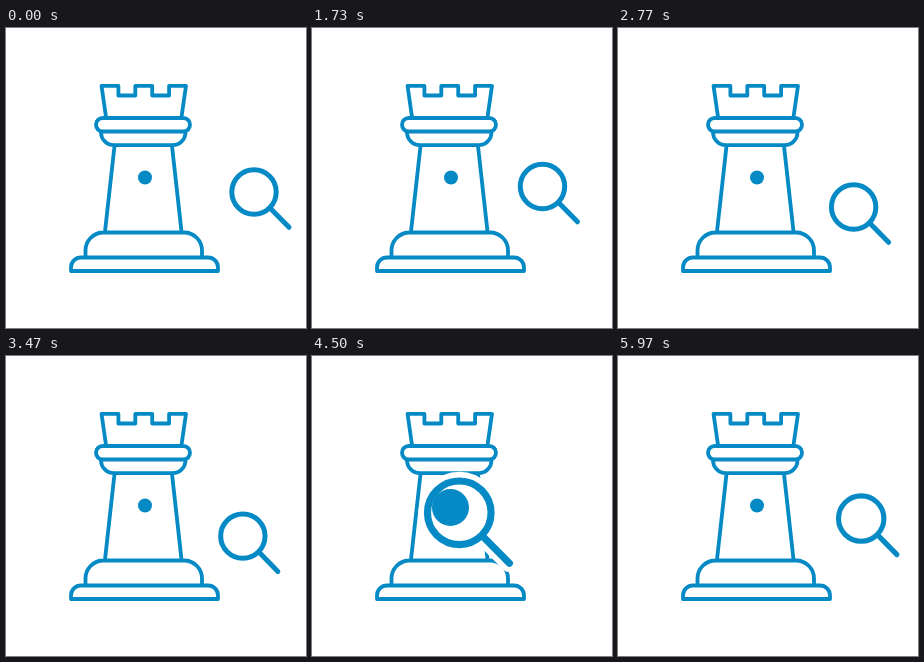
An HTML page with a canvas for the animation above (6010 ms loop, 300 by 300 pixels).

```html
<!DOCTYPE html>
<html lang="en">
<head>
<meta charset="utf-8">
<title>Rook and magnifier</title>
<style>
html, body { margin: 0; width: 100%; height: 100%; overflow: hidden; background: #fff; }
canvas { display: block; width: 300px; height: 300px; }
</style>
</head>
<body>
<canvas id="stage" width="300" height="300"></canvas>
<script>
const ctx = document.getElementById('stage').getContext('2d');
const BLUE = '#058ac6';
const LOOP = 6010;
const TICKS = 180;
const ZOOM = 1.48;
const STEP = 13.5; // ticks between wander points
const HOME = [248, 164];
const FOCUS = [138.5, 153.8];

// Lens centres of the idle wandering, evenly spaced in time
const WANDER = [
  HOME, [241, 148], [229.5, 149.5], [222.5, 163.5], [232, 158],
  [238, 163], [235, 178.5], [242, 176], [234, 181], [226.5, 174.5]
];
const REST = WANDER[WANDER.length - 1];
const REST_AT = STEP * (WANDER.length - 1);

const mix = (a, b, p) => a + (b - a) * p;

function ease(a, b, t) {
  const u = Math.min(1, Math.max(0, (t - a) / (b - a)));
  return u * u * (3 - 2 * u);
}

function makeRook() {
  const rook = new Path2D();
  rook.moveTo(100, 89);
  for (let i = 0; i < 5; i++) {
    const y = i % 2 ? 67.5 : 57.8;
    rook.lineTo(95.5 + i * 16.9, y);
    rook.lineTo(95.5 + (i + 1) * 16.9, y);
  }
  rook.lineTo(175.5, 89);
  rook.roundRect(90, 90, 94, 13.5, 6.7);
  rook.roundRect(95, 103.5, 84.5, 13.7, [0, 0, 13, 13]);
  rook.moveTo(108.5, 118);
  rook.lineTo(99, 203.5);
  rook.moveTo(166, 118);
  rook.lineTo(175.5, 203.5);
  rook.roundRect(79.5, 204.5, 116.5, 25, [18, 18, 0, 0]);
  rook.roundRect(65, 229.5, 147, 13.5, [10, 10, 0, 0]);
  return rook;
}
const ROOK = makeRook();

// Smooth curve through the wander points
function wander(t, axis) {
  const i = Math.min(WANDER.length - 2, Math.floor(t / STEP));
  const u = t / STEP - i;
  const at = n => WANDER[Math.min(WANDER.length - 1, Math.max(0, n))][axis];
  const [a, b, c, d] = [at(i - 1), at(i), at(i + 1), at(i + 2)];
  return b + u / 2 * (c - a + u * (2 * a - 5 * b + 4 * c - d + u * (3 * (b - c) + d - a)));
}

function glide(from, to, p, bend) {
  return {
    x: mix(from[0], to[0], p),
    y: mix(from[1], to[1], p) + bend * p * (1 - p)
  };
}

function lensAt(t) {
  if (t < REST_AT) return { x: wander(t, 0), y: wander(t, 1), s: 1 };
  if (t < 160) {
    const p = ease(REST_AT, 138, t);
    return { ...glide(REST, FOCUS, p, 10), s: mix(1, ZOOM, p) };
  }
  const p = ease(165, 180.8, t);
  return { ...glide(FOCUS, HOME, p, -24), s: mix(ZOOM, 1, p) };
}

function disc(x, y, r, color) {
  ctx.fillStyle = color;
  ctx.beginPath();
  ctx.arc(x, y, r, 0, Math.PI * 2);
  ctx.fill();
}

function handle(width, color) {
  ctx.strokeStyle = color;
  ctx.lineWidth = width;
  ctx.beginPath();
  ctx.moveTo(16.5, 16.5);
  ctx.lineTo(35, 35.3);
  ctx.stroke();
}

function drawLens({ x, y, s }) {
  ctx.save();
  ctx.translate(x, y);
  ctx.scale(s, s);
  disc(0, 0, 28.6, '#fff');
  handle(12.5, '#fff');
  ctx.restore();

  // Enlarged emblem, visible only through the glass
  ctx.save();
  ctx.beginPath();
  ctx.arc(x, y, 22 * s, 0, Math.PI * 2);
  ctx.clip();
  disc(138.5, 151.5, 18.5, BLUE);
  ctx.restore();

  ctx.save();
  ctx.translate(x, y);
  ctx.scale(s, s);
  handle(5, BLUE);
  ctx.beginPath();
  ctx.arc(0, 0, 22.2, 0, Math.PI * 2);
  ctx.stroke();
  ctx.restore();
}

function draw(now) {
  const t = (now % LOOP) / LOOP * TICKS;
  ctx.fillStyle = '#fff';
  ctx.fillRect(0, 0, 300, 300);
  ctx.lineCap = ctx.lineJoin = 'round';
  ctx.strokeStyle = BLUE;
  ctx.lineWidth = 3.8;
  ctx.stroke(ROOK);
  disc(139, 149.5, 7, BLUE);
  drawLens(lensAt(t));
}

let start;
function tick(now) {
  if (start === undefined) start = now;
  draw(Math.max(0, now - start));
  requestAnimationFrame(tick);
}
draw(0);
requestAnimationFrame(tick);
</script>
</body>
</html>
```
